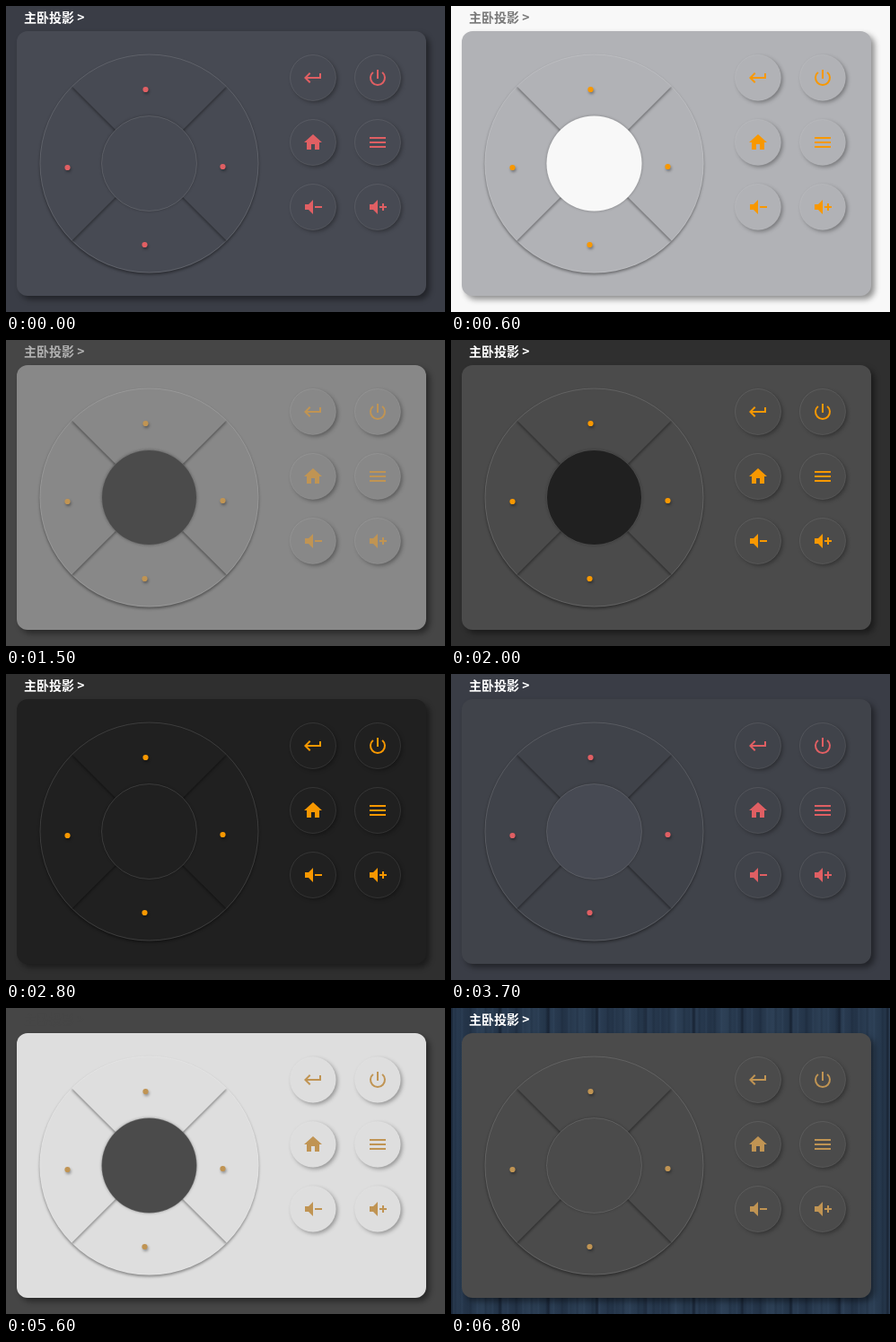
An HTML page that plays this animation: 489x341 px, repeating every 8000 ms.

```html
<!DOCTYPE html>
<html lang="zh">
<head>
<meta charset="utf-8">
<title>Remote</title>
<style>
  @property --bg { syntax: "<color>"; inherits: true; initial-value: #3a3d46; }
  @property --panel { syntax: "<color>"; inherits: true; initial-value: #474a53; }
  @property --hub { syntax: "<color>"; inherits: true; initial-value: #474a53; }
  @property --icon { syntax: "<color>"; inherits: true; initial-value: #e05f63; }
  @property --ink { syntax: "<color>"; inherits: true; initial-value: #fff; }
  @property --wood { syntax: "<number>"; inherits: true; initial-value: 0; }

  html, body { margin: 0; width: 100%; height: 100%; overflow: hidden; }
  html { animation: themes 8s step-end infinite; }
  body { position: relative; background: var(--bg); }
  body::before {
    content: ""; position: absolute; inset: 0; opacity: var(--wood);
    background:
      repeating-linear-gradient(90deg, #0000 0 3px, #14203040 4px 5px, #0000 7px 11px, #47607c30 12px, #0000 14px 17px),
      repeating-linear-gradient(90deg, #1a2637 0 1px, #2a3c52 3px, #233347 19px, #2d4056 34px, #243549 52px, #1a2637 54px);
  }
  svg { position: relative; display: block; width: 100%; height: 100%; }

  .title { font: 700 14px "Noto Sans CJK SC", "Noto Sans CJK", "Noto Sans", sans-serif; fill: var(--ink); }
  .panel { fill: var(--panel); filter: drop-shadow(4px 4px 3px rgba(0,0,0,.42)); }
  .sector { fill: var(--panel); filter: drop-shadow(0 2px 1.5px rgba(0,0,0,.38)); }
  .rim { fill: none; stroke: rgba(255,255,255,.13); }
  .hub { fill: var(--hub); stroke: rgba(255,255,255,.13); filter: drop-shadow(0 0 1.5px rgba(0,0,0,.32)); }
  .key { fill: var(--panel); stroke: rgba(255,255,255,.1); filter: drop-shadow(2px 2px 2px rgba(0,0,0,.32)); }
  .icon { fill: var(--icon); }
  .dot { fill: var(--icon); filter: drop-shadow(1px 2px 1.5px rgba(0,0,0,.35)); }

  @keyframes themes {
    /* slate */
    0%, 100% { --bg: #3a3d46; --panel: #474a53; --hub: #474a53; --icon: #e05f63; --ink: #fff; --wood: 0; }
    /* white */
    6.25%  { --bg: #f8f8f8; --panel: #595b64; --hub: #f8f8f8; --icon: #f89800; --ink: #e9e9e9; --wood: 0; }
    7.5%   { --bg: #f8f8f8; --panel: #b1b2b6; --hub: #f8f8f8; --icon: #f89800; --ink: #797979; --wood: 0; }
    8.75%  { --bg: #f8f8f8; --panel: #f8f8f8; --hub: #f8f8f8; --icon: #f89800; --ink: #202020; --wood: 0; }
    /* wood */
    16.25% { --bg: #464646; --panel: #f8f8f8; --hub: #4b4b4b; --icon: #c09453; --ink: #202020; --wood: 0; }
    17.5%  { --bg: #464646; --panel: #d5d5d5; --hub: #4b4b4b; --icon: #c09453; --ink: #4d4d4d; --wood: 0; }
    18.75% { --bg: #464646; --panel: #888; --hub: #4b4b4b; --icon: #c09453; --ink: #b1b1b1; --wood: 0; }
    20%    { --bg: #464646; --panel: #4b4b4b; --hub: #4b4b4b; --icon: #c09453; --ink: #fff; --wood: 0; }
    21.25% { --bg: #464646; --panel: #4b4b4b; --hub: #4b4b4b; --icon: #c09453; --ink: #fff; --wood: 1; }
    /* dark */
    25%    { --bg: #2f2f2f; --panel: #4b4b4b; --hub: #202020; --icon: #f89800; --ink: #fff; --wood: 0; }
    26.25% { --bg: #2f2f2f; --panel: #404040; --hub: #202020; --icon: #f89800; --ink: #fff; --wood: 0; }
    27.5%  { --bg: #2f2f2f; --panel: #2d2d2d; --hub: #202020; --icon: #f89800; --ink: #fff; --wood: 0; }
    28.75% { --bg: #2f2f2f; --panel: #222; --hub: #202020; --icon: #f89800; --ink: #fff; --wood: 0; }
    35%    { --bg: #2f2f2f; --panel: #202020; --hub: #202020; --icon: #f89800; --ink: #fff; --wood: 0; }
    /* slate */
    45%    { --bg: #3a3d46; --panel: #2e2f32; --hub: #474a53; --icon: #e05f63; --ink: #fff; --wood: 0; }
    46.25% { --bg: #3a3d46; --panel: #40434a; --hub: #474a53; --icon: #e05f63; --ink: #fff; --wood: 0; }
    /* white */
    55%    { --bg: #f8f8f8; --panel: #494c54; --hub: #f8f8f8; --icon: #f89800; --ink: #f4f4f4; --wood: 0; }
    56.25% { --bg: #f8f8f8; --panel: #77797f; --hub: #f8f8f8; --icon: #f89800; --ink: #bcbcbc; --wood: 0; }
    57.5%  { --bg: #f8f8f8; --panel: #d3d4d5; --hub: #f8f8f8; --icon: #f89800; --ink: #4d4d4d; --wood: 0; }
    58.75% { --bg: #f8f8f8; --panel: #f8f8f8; --hub: #f8f8f8; --icon: #f89800; --ink: #202020; --wood: 0; }
    /* wood */
    70%    { --bg: #464646; --panel: #dedede; --hub: #4b4b4b; --icon: #c09453; --ink: #464646; --wood: 0; }
    71.25% { --bg: #464646; --panel: #909090; --hub: #4b4b4b; --icon: #c09453; --ink: #a6a6a6; --wood: 1; }
    72.5%  { --bg: #464646; --panel: #4b4b4b; --hub: #4b4b4b; --icon: #c09453; --ink: #fff; --wood: 1; }
  }
</style>
</head>
<body>
<svg viewBox="0 0 489 341">
  <defs>
    <path id="wedge" d="M0 0L-86.3-86.3A122 122 0 0 1 86.3-86.3Z"/>
    <circle id="key" class="key" r="25.5"/>
  </defs>

  <text class="title" x="20" y="18">主卧投影 &gt;</text>
  <rect class="panel" x="12" y="28" width="456" height="295" rx="12"/>

  <g transform="translate(159.5 175.5)">
    <g class="sector"><use href="#wedge" transform="rotate(180)"/></g>
    <g class="sector"><use href="#wedge" transform="rotate(-90)"/></g>
    <g class="sector"><use href="#wedge" transform="rotate(90)"/></g>
    <g class="sector"><use href="#wedge"/></g>
    <circle class="rim" r="121.5"/>
    <circle class="hub" r="53"/>
  </g>
  <g class="dot">
    <circle cx="155.5" cy="93" r="3.1"/>
    <circle cx="68.5" cy="180" r="3.1"/>
    <circle cx="241.5" cy="179" r="3.1"/>
    <circle cx="154.5" cy="266" r="3.1"/>
  </g>

  <use href="#key" x="342" y="80"/>
  <use href="#key" x="414" y="80"/>
  <use href="#key" x="342" y="152"/>
  <use href="#key" x="414" y="152"/>
  <use href="#key" x="342" y="224"/>
  <use href="#key" x="414" y="224"/>
  <g class="icon">
    <path transform="translate(330 68)" d="M19 7v4H5.83l3.58-3.59L8 6l-6 6 6 6 1.41-1.41L5.83 13H21V7z"/>
    <path transform="translate(402 68)" d="M13 3h-2v10h2zm4.83 2.17l-1.42 1.42A7 7 0 1 1 7.58 6.58L6.17 5.17a9 9 0 1 0 11.66 0z"/>
    <path transform="translate(330 140)" d="M10 20v-6h4v6h5v-8h3L12 3 2 12h3v8z"/>
    <path transform="translate(402 140)" d="M3 6h18v2H3zM3 11h18v2H3zM3 16h18v2H3z"/>
    <path transform="translate(330 212)" d="M3 9h4l5-5v16l-5-5H3zM14 11h8v2h-8z"/>
    <path transform="translate(402 212)" d="M3 9h4l5-5v16l-5-5H3zM14 11h3V8h2v3h3v2h-3v3h-2v-3h-3z"/>
  </g>
</svg>
</body>
</html>
```
